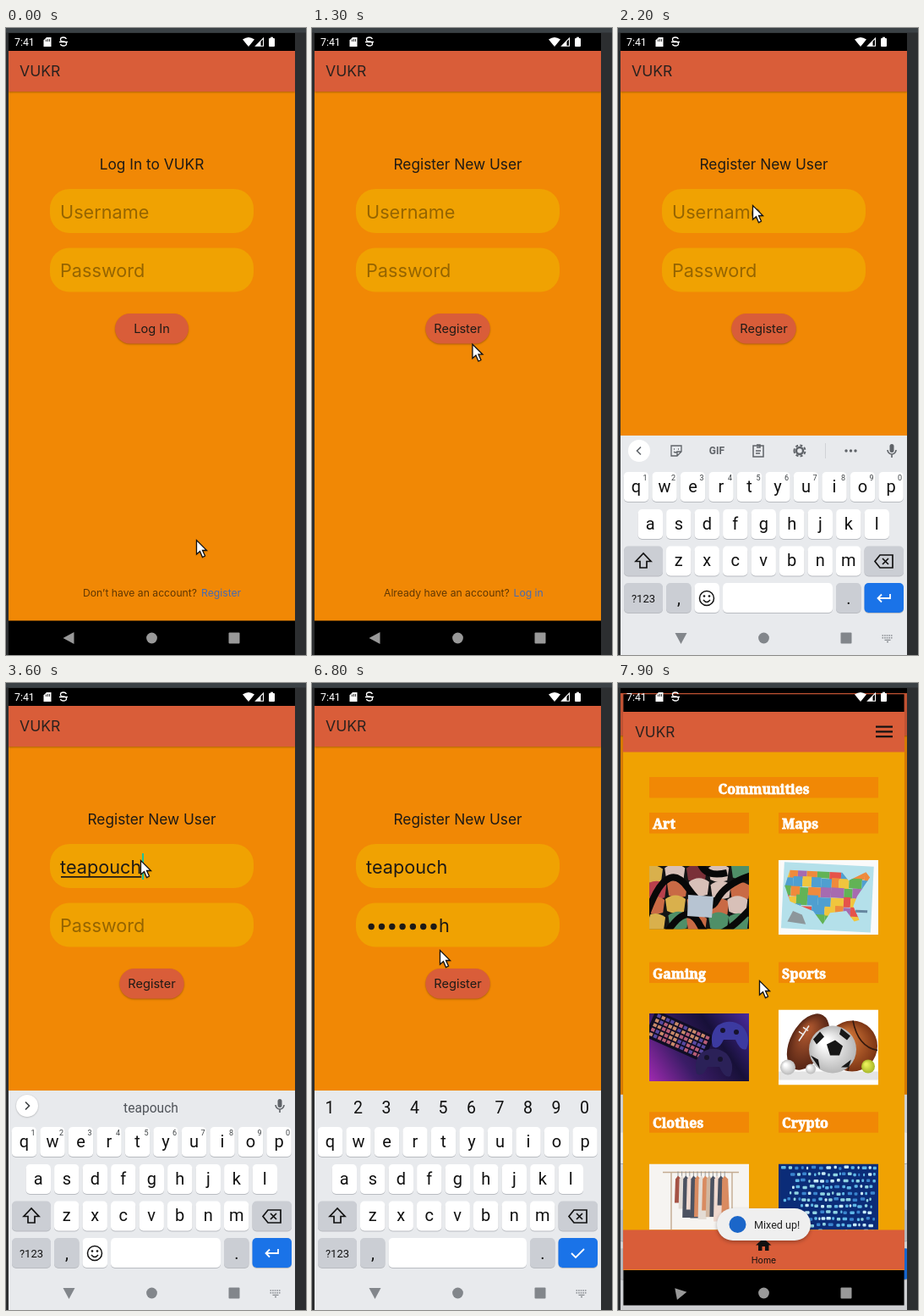
Animation of 355 by 740 pixels, one loop 8 s. Source, as an HTML page with a canvas:

```html
<!DOCTYPE html>
<html lang="en">
<head>
<meta charset="utf-8">
<title>Sign-up flow</title>
<style>
html, body { margin: 0; width: 100%; height: 100%; overflow: hidden; background: #2c2e30; }
canvas { display: block; width: 355px; height: 740px; }
</style>
</head>
<body>
<canvas></canvas>
<script>
const LOOP = 8000, STEP = 100;
const RED = '#d95d39', ORANGE = '#f18805', AMBER = '#f0a202', INK = '#1e1a16';
const APP = 'VUKR', USER = 'teapouch';
const INTER = 'Inter, sans-serif', ROBOTO = 'Roboto, sans-serif', SERIF = '"Noto Serif", serif';
const CX = 172.5, CY = 373;
const userKeys = [2600, 2700, 2800, 3000, 3200, 3400, 3500, 3600];
const passKeys = [5200, 5300, 5400, 5500, 5700, 5800, 5900, 6000];
const hints = ['the|to', 'ten|tell', 'teach|team', 'tea|teapot', 'teapot|teapots', 'teapot|teapots'];
// pointer path: time, x, y
const path = [[0, 225, 604], [500, 240, 668], [780, 240, 668], [900, 230, 591], [1600, 159, 209],
  [3900, 159, 209], [4100, 258, 240], [4300, 66, 265], [4400, 152, 271], [6400, 152, 271],
  [6600, 118, 296], [6800, 151, 315], [7000, 165, 346], [7700, 165, 346], [7900, 167, 351]];

const dpr = window.devicePixelRatio || 1;
function prepare(canvas) {
  canvas.width = 355 * dpr;
  canvas.height = 740 * dpr;
  return canvas.getContext('2d');
}
let c = prepare(document.querySelector('canvas'));
const spare = prepare(document.createElement('canvas'));

const clamp = v => Math.min(1, Math.max(0, v));
const typed = (keys, t) => keys.filter(k => k <= t).length;

// draws a group that fades as one
function layer(alpha, draw) {
  if (alpha >= 1) return draw();
  const main = c, m = c.getTransform();
  c = spare;
  c.resetTransform();
  c.clearRect(0, 0, c.canvas.width, c.canvas.height);
  c.setTransform(m);
  draw();
  c = main;
  c.save();
  c.resetTransform();
  c.globalAlpha = alpha;
  c.drawImage(spare.canvas, 0, 0);
  c.restore();
}
function rect(x, y, w, h, color, r = 0) {
  c.fillStyle = color;
  c.beginPath();
  c.roundRect(x, y, w, h, r);
  c.fill();
}
function disc(x, y, r, color) {
  c.fillStyle = color;
  c.beginPath();
  c.arc(x, y, r, 0, 7);
  c.fill();
}
function fill(d, color) {
  c.fillStyle = color;
  c.fill(new Path2D(d));
}
function line(d, color, width = 1.6) {
  c.strokeStyle = color;
  c.lineWidth = width;
  c.stroke(new Path2D(d));
}
// y is the middle of the capitals
function text(s, x, y, size, color = INK, align = 'left', font = INTER, weight = 400) {
  c.font = `${weight} ${size}px ${font}`;
  c.textAlign = align;
  c.fillStyle = color;
  c.fillText(s, x, y + size * .36);
  return c.measureText(s).width;
}
function label(s, x, y, align) {
  text(s, x, y, 16, '#fff', align, SERIF, 900);
  c.strokeStyle = '#fff';
  c.lineWidth = .8;
  c.strokeText(s, x, y + 16 * .36);
}
function shadowed(draw, blur = 2, dy = 1) {
  c.save();
  c.shadowColor = 'rgba(0,0,0,.28)';
  c.shadowBlur = blur * dpr;
  c.shadowOffsetY = dy * dpr;
  draw();
  c.restore();
}
function at(x, y, scale, draw) {
  c.save();
  c.translate(x, y);
  c.scale(scale, scale);
  draw();
  c.restore();
}
const zoom = (s, draw) => at(CX, CY, s, () => { c.translate(-CX, -CY); draw(); });

function page(heading, question, link, qx, linkX) {
  rect(3, 6, 339, 736, '#000');
  rect(3, 27, 339, 672.5, ORANGE);
  shadowed(() => rect(3, 27, 339, 48, RED));
  text(APP, 16, 51, 17.6, '#2a211e');
  text(heading, CX, 161, 17.3, INK, 'center');
  rect(52, 190, 241, 52, AMBER, 23);
  rect(52, 259.5, 241, 52, AMBER, 23);
  text(question, qx, 667, 12.2, 'rgba(0,0,0,.6)');
  text(link, linkX, 667, 12.2, '#456bb4');
}
function button(s, w) {
  shadowed(() => rect(CX - w / 2, 337, w, 35.5, RED, 18));
  text(s, CX, 355, 14.6, INK, 'center');
}
function placeholder(s, y) { text(s, 64, y, 21.7, 'rgba(0,0,0,.38)'); }
function caret(x, y, since, t) {
  if ((t - since) % 1000 < 500) rect(x + .8, y - 16, 2, 31, '#1fc39a');
}
function login() {
  page(`Log In to ${APP}`, 'Don\u2019t have an account?', 'Register', 91, 231);
  placeholder('Username', 217);
  placeholder('Password', 286);
  button('Log In', 87);
}
function register(t) {
  page('Register New User', 'Already have an account?', 'Log in', 85, 238.5);
  const n = typed(userKeys, t), m = typed(passKeys, t);
  let x = 64;
  if (n) {
    const w = text(USER.slice(0, n), x, 217, 21.7);
    if (t < 4600) rect(65, 228, w - 1, 1.8, INK);
    x += w;
  } else placeholder('Username', 217);
  if (t >= 1700 && t < 4600) caret(x, 217, n ? userKeys[n - 1] : 1700, t);

  x = 64;
  if (m) {
    const dots = t >= 7500 ? m : m - 1;
    for (let i = 0; i < dots; i++, x += 12.3) disc(x + 6.2, 287.5, 3.7, INK);
    if (dots < m) x += text(USER[m - 1], x, 286, 21.7);
  } else placeholder('Password', 286);
  if (t >= 4600) caret(x, 286, m ? passKeys[m - 1] : 4600, t);

  button('Register', 76.5);
  if (t >= 7200 && t < 7500) {
    c.save();
    c.beginPath();
    c.roundRect(134.3, 337, 76.5, 35.5, 18);
    c.clip();
    disc(165, 348, 20 + (t - 7200) / 5, 'rgba(255,255,255,.2)');
    c.restore();
  }
  if (t >= 1900) {
    const left = 1 - clamp((t - 1900) / 300);
    layer(.13 + .87 * (1 - left ** 2), () => {
      c.save();
      c.translate(0, 191 * left ** 3);
      keyboard(t, n);
      c.restore();
    });
  }
}

function mic(x, y, color) {
  rect(x - 2.5, y - 8, 5, 10, color, 2.5);
  line(`M${x - 5} ${y - 1}a5 5 0 0 0 10 0M${x} ${y + 4}v4`, color);
}
function toolbar() {
  const g = '#5f6368';
  disc(25, 499, 13, '#fff');
  line('M27 494.5l-4.5 4.5l4.5 4.5', g);
  line('M63 493h12v7l-5 5h-7zM75 500h-5v5M66 497h1M71 497h1M66 500q2 2 4 0', g, 1.3);
  text('GIF', 117, 499, 12, g, 'center', ROBOTO, 700);
  line('M160 493h12v13h-12zM164 492h4v3h-4M163 499h6M163 502h5', g, 1.5);
  c.save();
  c.setLineDash([3, 2.3]);
  line('M208.5 499a6.5 6.5 0 1 0 13 0a6.5 6.5 0 1 0 -13 0', g, 2);
  c.restore();
  line('M211 499a4 4 0 1 0 8 0a4 4 0 1 0 -8 0', g, 2.4);
  rect(245, 490, 1, 18, '#d0d2d6');
  [270, 275.5, 281].forEach(x => disc(x, 499, 1.7, g));
  mic(324, 499, g);
}
function key(x, y, w, color = '#fff') {
  rect(x, y + 1, w, 35, '#b9bcc1', 5);
  rect(x, y, w, 35, color, 5);
}
function keyboard(t, n) {
  const pass = t >= 4600, grey = '#cbced4', ink = '#111';
  rect(3, 481, 339, 261, '#e8eaed');
  if (pass) [...'1234567890'].forEach((d, i) => text(d, 21 + 33.5 * i, 501, 19.5, ink, 'center', ROBOTO));
  else if (n) {
    shadowed(() => disc(25, 499, 13, '#fff'), 2, .5);
    line('M23 494.5l4.5 4.5l-4.5 4.5', '#3c4043');
    const word = (s, x) => text(s, x, 501, 15.6, '#50545a', 'center', ROBOTO);
    word(USER.slice(0, n), CX - 1);
    if (hints[n - 1]) {
      const [a, b] = hints[n - 1].split('|');
      word(a, 83);
      word(b, 258);
      rect(127, 492, 1, 17, '#cdd0d4');
      rect(215, 492, 1, 17, '#cdd0d4');
    }
    mic(324, 499, '#5f6368');
  } else toolbar();

  [['qwertyuiop', 21.5, 524], ['asdfghjkl', 38.3, 568], ['zxcvbnm', 71.7, 611.5]].forEach(([row, x0, y], r) =>
    [...row].forEach((s, i) => {
      const x = x0 + 33.5 * i;
      key(x - 14.7, y, 29.4);
      text(s, x, y + 16.5, 20, ink, 'center', ROBOTO);
      if (!r && !pass) text((i + 1) % 10, x + 10.5, 531, 9, '#3c4043', 'center', ROBOTO);
    }));
  key(7, 611.5, 46, grey);
  line('M30 620l-9 9.5h5v7.5h8v-7.5h5z', ink, 1.7);
  key(291.5, 611.5, 46.5, grey);
  line('M304 629.5l6 -7.5h15v15h-15zM313 626l7 7M320 626l-7 7', ink, 1.7);
  key(7, 655, 46, grey);
  text('?123', 30, 673, 13, ink, 'center', ROBOTO);
  key(57, 655, 29.5, grey);
  text(',', 72, 673, 20, ink, 'center', ROBOTO);
  if (pass) key(90.5, 655, 163.5);
  else {
    key(90.5, 655, 29.5);
    key(124, 655, 130);
    line('M96.5 673a8.500 8.500 0 1 0 17 0a8.500 8.500 0 1 0 -17 0M101 675q4 5 8 0', ink, 1.5);
    disc(102, 670.5, 1.3, ink);
    disc(108, 670.5, 1.3, ink);
  }
  key(258, 655, 29.5, grey);
  text('.', 273, 673, 20, ink, 'center', ROBOTO);
  key(291.5, 655, 46.5, '#1a73e8');
  line(pass ? 'M307 673l5 5l10 -10' : 'M322 668v5h-14M312 668.5l-4.5 4.5l4.5 4.5', '#fff', 1.8);
}

function picture(x, y, w, h, bg, draw) {
  c.save();
  c.beginPath();
  c.rect(x, y, w, h);
  c.clip();
  c.translate(x, y);
  rect(0, 0, w, h, bg);
  let seed = 7;
  draw(() => (seed = seed * 16807 % 2147483647) / 2147483647);
  c.restore();
}
function art(rnd) {
  const tones = ['#b8404c', '#d9b04c', '#4f8f68', '#d8c0b8', '#7a3038', '#c96a45'];
  for (let i = 0; i < 20; i++) {
    const x = i % 5 * 25 + rnd() * 6 - 8, y = (i / 5 | 0) * 20 + rnd() * 6 - 6;
    fill(`M${x} ${y + 4}q12 -9 24 0l-2 15q-11 4 -20 -1z`, tones[rnd() * 6 | 0]);
  }
  line('M-4 60Q20 -10 45 25T80 40T124 10M20 80Q45 40 60 70T120 50M60 -4Q66 14 92 8', '#080808', 8);
  fill('M46 34l30 2l-2 25l-29 -2z', '#b7c4d2');
}
function map(rnd) {
  c.rotate(.05);
  rect(7, 2, 106, 78, '#b4e0ea');
  const tones = ['#e5534b', '#f0c53e', '#62b356', '#ef8a3c', '#a66bb0', '#4f9fd0'];
  c.save();
  c.clip(new Path2D('M14 11L76 11L84 20L104 9L109 15L95 38L91 50L99 66L93 68L83 56L64 59L56 73L44 58L16 48L9 30z'));
  for (let y = 6; y < 76; y += 11)
    for (let x = 6; x < 112;) {
      const w = 8 + rnd() * 8;
      rect(x, y + rnd() * 3, w, 12, tones[rnd() * 6 | 0]);
      x += w;
    }
  c.restore();
  fill('M14 72l6 -13l11 4l5 11z', '#8d979b');
  rect(94, 54, 14, 3, '#6687a0');
}
function gaming(rnd) {
  const g = c.createLinearGradient(0, 80, 118, 0);
  ['#a02ab0', '#3a1c66', '#171038', '#4a2aa0'].forEach((s, i) => g.addColorStop(i / 3, s));
  rect(0, 0, 118, 80, g);
  c.save();
  c.translate(8, -4);
  c.rotate(.42);
  rect(0, 0, 76, 34, '#100d24', 3);
  for (let i = 0; i < 60; i++)
    rect(4 + i % 12 * 5.7, 3 + (i / 12 | 0) * 5.9, 4.3, 4, ['#5848a0', '#b95d76', '#c98a6a'][rnd() * 3 | 0]);
  c.restore();
  const pad = (x, y, color) => {
    fill(`M${x} ${y}q15 -9 29 1q11 12 5 27q-7 3 -13 -11h-14q-6 13 -13 8q-4 -16 6 -25z`, color);
    disc(x + 6, y + 6, 3, '#17132d');
    disc(x + 22, y + 8, 3, '#17132d');
  };
  pad(81, 14, '#3c3aa0');
  pad(62, 46, '#2b2158');
}
function ball(x, y, r, light, dark) {
  const g = c.createRadialGradient(x - r / 3, y - r / 3, r / 6, x, y, r);
  g.addColorStop(0, light);
  g.addColorStop(1, dark);
  disc(x, y, r, g);
}
function sports() {
  rect(0, 73, 118, 10, '#e4e4e4');
  ball(87, 43, 30, '#d87a3a', '#7b3414');
  line('M65 24Q91 42 82 72M88 13Q94 44 117 48', '#33190e', 1.5);
  c.save();
  c.translate(35, 38);
  c.rotate(.5);
  c.scale(.58, 1);
  ball(0, 0, 36, '#a8542d', '#562515');
  c.restore();
  line('M24 37l12 -18M24 26l6 4M29 21l6 4', '#eee', 1.5);
  ball(64, 47, 28, '#fff', '#b7b7b7');
  fill('M57 41l10 -5l9 7l-4 11h-11zM41 35l8 -9l5 6l-9 9zM74 22l11 9l-4 5l-9 -7zM38 54l9 5l2 11zM74 68l12 -9l-3 9z', '#171717');
  ball(11, 68, 9, '#fff', '#bbb');
  ball(106, 67, 8, '#e9ef59', '#a9b829');
  ball(38, 70, 6, '#fff', '#bbb');
}
function clothes(rnd) {
  line('M16 10H106M26 10V80M98 10V80', '#c3ab91', 1.4);
  const tones = ['#d2b7a0', '#e4dcd4', '#b83d39', '#4c5261', '#d98b61', '#f0d9cf', '#a55345'];
  for (let i = 0; i < 13; i++) {
    const x = 31 + i * 4.6, h = 28 + rnd() * 24;
    line(`M${x + 3} 9v6`, '#888', .8);
    fill(`M${x} 18l3 -4l4 4l2 ${h}h-10z`, tones[rnd() * 7 | 0]);
  }
}
function crypto(rnd) {
  const tones = ['#5fb8e8', '#c7ecfa', '#3a85cf', '#8fd4e3'];
  for (let y = 2; y < 80; y += 7.5)
    for (let x = 3 + rnd() * 24; x < 112;) {
      const w = 2 + rnd() * 4;
      rect(x, y + rnd() * 2, w, 3.5, tones[rnd() * 4 | 0], 1);
      x += w + 1 + rnd() * 3;
    }
}
function home() {
  rect(3, 6, 339, 736, '#000');
  zoom(1 / .98, () => {
    rect(6, 34, 333, 659, AMBER);
    rect(6, 34, 333, 47.5, RED);
    text(APP, 20, 58, 17.2, '#2a211e');
    [50.5, 56.3, 62.1].forEach(y => rect(305, y, 20, 2.2, '#111'));
    rect(37, 111, 271, 24.5, ORANGE);
    label('Communities', CX, 125, 'center');
    ['Art', 'Maps', 'Gaming', 'Sports', 'Clothes', 'Crypto'].forEach((s, i) => {
      const x = i % 2 ? 190 : 37, y = 153 + 176.6 * (i >> 1);
      rect(x, y, 118, 24.5, ORANGE);
      label(s, x + 4, y + 13.5, 'left');
    });
    picture(37, 216, 118, 74.5, '#141414', art);
    picture(190, 209, 118, 88, '#fafafa', map);
    picture(37, 390, 118, 80, '#20133f', gaming);
    picture(190, 385.5, 118, 89, '#fff', sports);
    picture(37, 567.5, 118, 78, '#f6f4f1', clothes);
    picture(190, 567.5, 118, 78, '#0b2c78', crypto);
    rect(6, 645.5, 333, 47, RED);
    fill('M172 655.5l-9 8h3v6.5h4.5v-5h3.5v5h4.5v-6.5h3z', '#111');
    text('Home', 172.5, 681, 10.5, '#111', 'center');
  });
}

// new window grows in over the old one, which grows out and dims
function transition(t, start, from, to) {
  const p = 1 - Math.exp(-.0149 * (t - start));
  zoom(1 + .05 * p, from);
  rect(3, 6, 339, 734, `rgba(0,0,0,${.13 * p})`);
  layer(clamp((t - start) / 83), () => zoom(.85 + .15 * p, to));
}
function status() {
  const w = '#fff';
  text('7:41', 10, 16.5, 12.3, w, 'left', ROBOTO);
  fill('M48 11h5.5v11h-9v-7.5z', w);
  line('M47.5 13.5v2.5M49.5 13v3M51.5 13v3', '#000', .8);
  line('M71.5 13q-1 -2 -3.5 -2q-3.5 0 -3.5 2.5t3.5 2.5t3.5 2.5t-3.5 2.5q-3 0 -3.5 -2M63 16.5h10', w, 1.3);
  fill('M287 22l-7 -8.5q7 -5 14 0z', w);
  line('M295.5 21.2h9v-9z', w, 1.1);
  fill('M295.5 21.2h6v-6z', w);
  rect(311, 12, 7, 10, w, 1);
  rect(313, 10.7, 3, 2, w);
}
function nav(t) {
  const open = t >= 2000 && t < 7800, color = open ? '#82868b' : '#999';
  const turn = t < 1900 ? 0 : t >= 7900 ? -191 : -90 * clamp((t - 1900) / 200);
  at(74.5, 720, 1, () => {
    c.rotate(turn * Math.PI / 180);
    fill('M-7 0L6 -7V7z', color);
  });
  disc(172.5, 720, 6.4, color);
  rect(263.5, 713.5, 13, 13, color, 1);
  if (t >= 1900 && t < 7800) {
    c.save();
    c.setLineDash([1.6, 1]);
    line('M312.5 717h13M312.5 719.7h13', '#8a8e93', 1.6);
    c.restore();
    line('M315.5 722.4h7M318 724.5h2', '#8a8e93', 1.4);
  }
}
function toast(t) {
  layer(clamp((t - 7750) / 140), () => {
    shadowed(() => rect(117, 620, 111, 38, '#efefef', 19), 4, 2);
    disc(141.5, 639, 10, '#1b66c9');
    text('Mixed up!', 161, 639, 12.6, '#222', 'left', ROBOTO);
  });
}
function pointer(t) {
  let i = path.findIndex(p => p[0] > t);
  if (i < 0) i = path.length;
  const a = path[i - 1], b = path[i] || a, k = b === a ? 0 : (t - a[0]) / (b[0] - a[0]);
  at(a[1] + (b[1] - a[1]) * k, a[2] + (b[2] - a[2]) * k, 1, () => {
    const d = 'M.5 .5V17L4.5 13.5L7.5 20.5L10.5 19L7.5 12.5H12.5z';
    shadowed(() => fill(d, '#fff'));
    line(d, '#111', 1.3);
  });
}

function draw(t) {
  c.setTransform(dpr, 0, 0, dpr, 0, 0);
  rect(0, 0, 355, 740, '#2c2e30');
  rect(0, 0, 355, 5.5, '#3b4145');
  c.save();
  c.beginPath();
  c.rect(3, 6, 339, 734);
  c.clip();
  if (t < 800) login();
  else if (t < 1250) transition(t, 780, login, () => register(t));
  else if (t < 7800) register(t);
  else transition(t, 7765, () => register(t), home);
  status();
  nav(t);
  if (t >= 7800) toast(t);
  c.restore();
  pointer(t);
}
const begin = performance.now();
function frame() {
  const t = (performance.now() - begin) % LOOP;
  draw(Math.floor(t / STEP) * STEP);
  requestAnimationFrame(frame);
}
frame();
</script>
</body>
</html>
```
